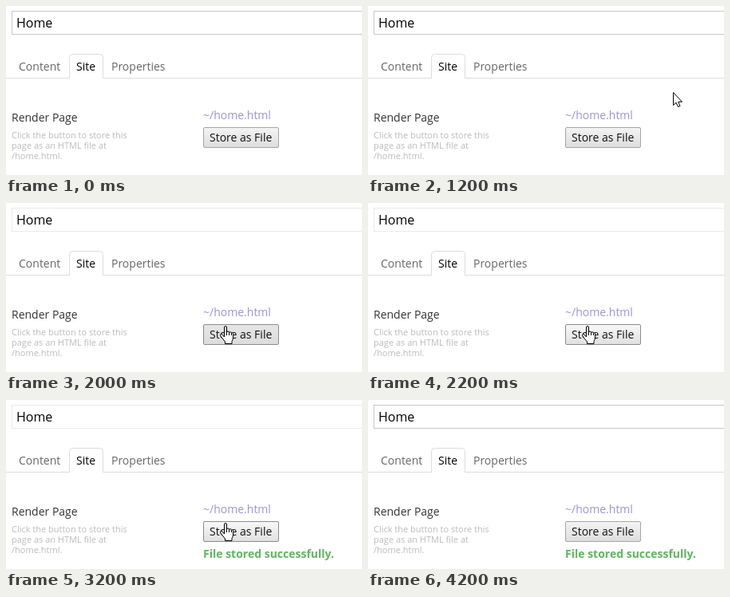
An HTML page for the animation above (4.8 s loop, 446x212 px).

```html
<!DOCTYPE html>
<html lang="en">
<head>
<meta charset="utf-8">
<title>Store as File</title>
<style>
  html, body { margin: 0; width: 100%; height: 100%; overflow: hidden; background: #fff; }
  svg { display: block; }
  text { font: 14px "Open Sans", sans-serif; fill: #333; }
  .help text { font-size: 11px; fill: #bbb; }
  .tab { fill: #666; }
  #status { font-weight: bold; }
  .cursor { fill: #fff; stroke: #000; stroke-linejoin: round; }
</style>
</head>
<body>
<svg width="446" height="212" viewBox="0 0 446 212">
  <defs>
    <linearGradient id="normal" x2="0" y2="1"><stop stop-color="#f4f4f4"/><stop offset="1" stop-color="#dddddd"/></linearGradient>
    <linearGradient id="hover" x2="0" y2="1"><stop stop-color="#f8f8f8"/><stop offset="1" stop-color="#e0e0e0"/></linearGradient>
    <linearGradient id="pressed" x2="0" y2="1"><stop stop-color="#e6e6e6"/><stop offset="1" stop-color="#dcdcdc"/></linearGradient>
  </defs>

  <rect id="field" x="7.5" y="6.5" width="450" height="29" fill="#fff"/>
  <text x="13" y="27" style="font-size:16px;fill:#000">Home</text>

  <path d="M0 90.5H79.5V64.5q0-4 4-4H117.500q4 0 4 4V90.5H446" fill="none" stroke="#ddd"/>
  <text class="tab" x="16" y="81">Content</text>
  <text x="88" y="81" style="fill:#000">Site</text>
  <text class="tab" x="132" y="81">Properties</text>

  <text x="7" y="145">Render Page</text>
  <g class="help">
    <text x="7" y="166">Click the button to store this</text>
    <text x="7" y="179">page as an HTML file at</text>
    <text x="7" y="192">/home.html.</text>
  </g>

  <text x="247" y="142" style="fill:#9a94dc">~/home.html</text>
  <rect id="button" x="247.5" y="152.5" width="94" height="25" rx="1.5"/>
  <text id="label" x="255" y="170">Store as File</text>
  <text id="status" x="247" y="198"></text>

  <path id="arrow" class="cursor" d="M.5.5V16.5L4 13.200 6.500 18.500 9 17.500 6.700 12.200H11.500Z"/>
  <g id="hand" class="cursor">
    <path d="M5.500 14V2a1.500 1.500 0 0 1 3 0V8q0-1 1.500-1t1.500 1.700q0-.9 1.500-.9t1.500 1.800q0-.8 1-.8t1 1.700V15q0 2-1.500 4.500V22.500H6.500V20L2 14.500Q0 12 .8 11t2.200 0Z"/>
    <path d="M8.500 8v4M11.500 8.700V12M14.500 9.600V12" fill="none"/>
  </g>
</svg>
<script>
const LOOP = 4800;
const $ = id => document.getElementById(id);

// Each step: start time, cursor shape, x, y
const pointer = [
  [0], [1000, 'arrow', 417, 84], [1200, 'arrow', 382, 108],
  [1400, 'arrow', 349, 121], [1600, 'arrow', 325, 134],
  [1800, 'hand', 288, 152], [2000, 'hand', 268, 154],
  [3600, 'arrow', 325, 138], [3800]
];
const buttonStates = [
  [0, 'normal'], [1800, 'hover'], [2000, 'pressed'], [2200, 'hover'],
  [2400, 'disabled'], [3200, 'hover'], [3800, 'normal']
];
const messages = [
  [0, '', '#999'], [2400, 'Storing file...', '#999'],
  [3200, 'File stored successfully.', '#60b560']
];

const at = (steps, t) => steps.filter(s => s[0] <= t).pop();
const set = (id, name, value) => $(id).setAttribute(name, value);

function draw(now) {
  const t = now % LOOP;

  const [, shape, x, y] = at(pointer, t);
  for (const id of ['arrow', 'hand']) {
    set(id, 'visibility', id === shape ? 'visible' : 'hidden');
    if (id === shape) set(id, 'transform', `translate(${x} ${y})`);
  }

  const state = at(buttonStates, t)[1];
  const disabled = state === 'disabled';
  const active = state === 'hover' || state === 'pressed';
  set('button', 'fill', `url(#${disabled ? 'normal' : state})`);
  set('button', 'stroke', active ? '#8c8c8c' : '#a6a6a6');
  $('label').style.fill = disabled ? '#8a8a8a' : '#111';

  const [, message, color] = at(messages, t);
  $('status').textContent = message;
  $('status').style.fill = color;

  set('field', 'stroke', t >= 2000 && t < 4200 ? '#ebebeb' : '#c8c8c8');
  requestAnimationFrame(draw);
}
draw(0);
</script>
</body>
</html>
```
